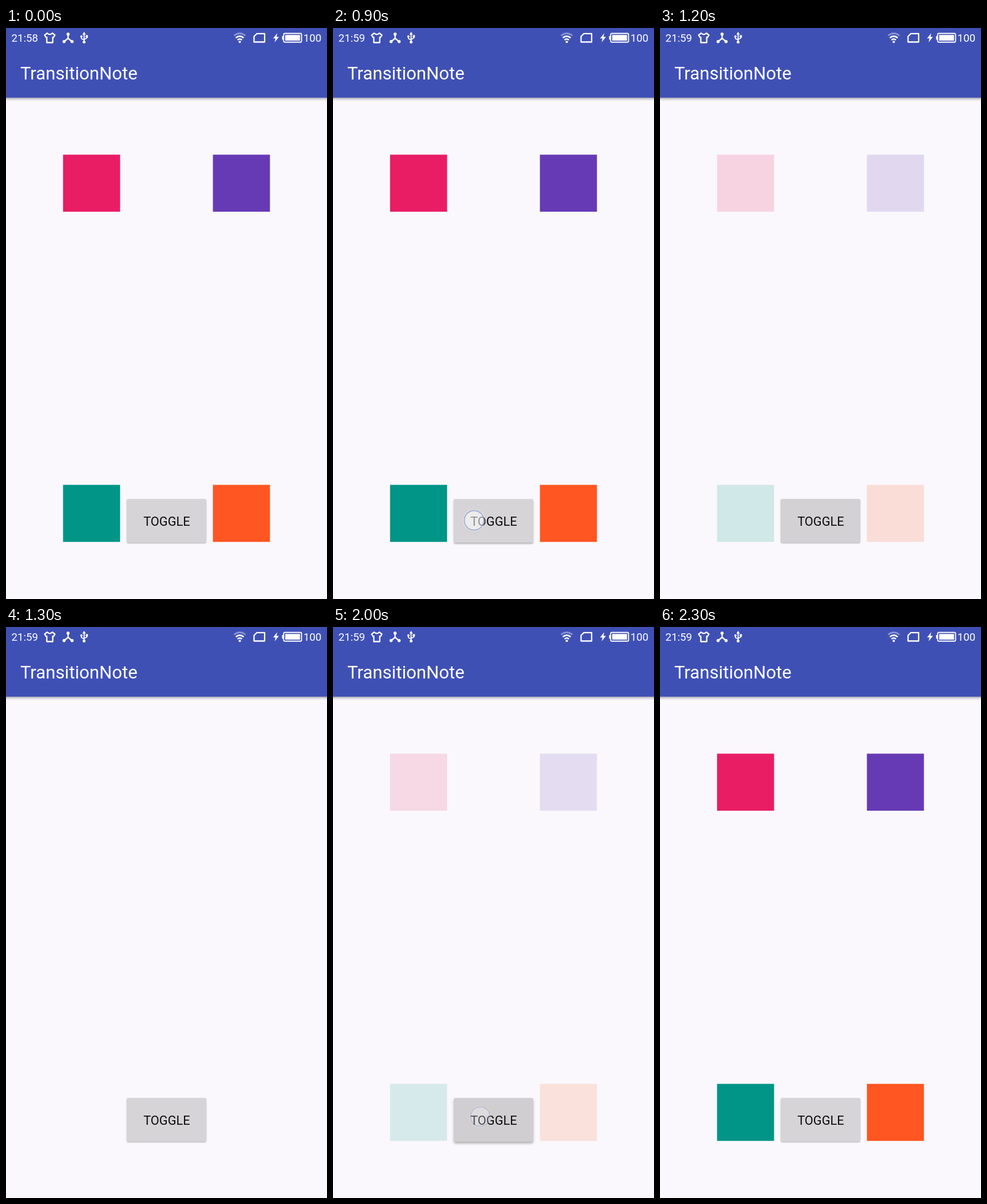
Animation of 561x998 px, one loop 2.4 s. Source, as an HTML page:

```html
<!DOCTYPE html>
<html lang="en">
<head>
<meta charset="utf-8">
<title>Fade transition</title>
<style>
  html, body { margin: 0; width: 100%; height: 100%; overflow: hidden; background: #faf8fc; }
  svg { display: block; width: 561px; height: 998px; }
  text { font-family: Roboto, "Noto Sans", sans-serif; fill: #fff; }
  .status { font-size: 18.7px; }
  .title { font-size: 31.2px; }
  .label { font-size: 21.8px; fill: #0c0c0c; text-anchor: middle; }
  .line { fill: none; stroke: #fff; stroke-width: 2.3; stroke-linejoin: round; }
  .icons { fill: #fff; }

  /* Everything holds for 100 ms ticks, so each track is stepped. */
  .before, .after, .boxes, .button, .touch { animation: 2400ms step-end infinite; }
  .before { animation-name: before; }
  .after { animation-name: after; }
  .boxes { animation-name: fade; }
  .button { animation-name: press; fill: #d6d4d6; }
  .touch { opacity: 0; }
  .first { animation-name: first; }
  .second { animation-name: second; }

  @keyframes before { 0% { opacity: 1 } 4.166%, 100% { opacity: 0 } }
  @keyframes after { 0% { opacity: 0 } 4.166%, 100% { opacity: 1 } }

  /* Accelerate-decelerate alpha, 300 ms out and 300 ms in. */
  @keyframes fade {
    0% { opacity: 1 }
    41.666% { opacity: .99 }
    45.833% { opacity: .647 }
    50% { opacity: .165 }
    54.166% { opacity: 0 }
    83.333% { opacity: .143 }
    87.5% { opacity: .624 }
    91.666% { opacity: .98 }
    95.833%, 100% { opacity: 1 }
  }

  @keyframes press {
    0%, 54.166%, 95.833%, 100% { fill: #d6d4d6; filter: drop-shadow(0 1.6px 1.2px rgba(0,0,0,.3)) }
    37.5% { fill: #d6d4d6; filter: drop-shadow(0 2.2px 1.5px rgba(0,0,0,.3)) }
    41.666% { fill: #d3d1d3; filter: drop-shadow(0 3.4px 2px rgba(0,0,0,.3)) }
    45.833%, 87.5% { fill: #cfccce; filter: drop-shadow(0 1.6px 1.2px rgba(0,0,0,.3)) }
    50%, 91.666% { fill: #d3d1d3; filter: drop-shadow(0 1.6px 1.2px rgba(0,0,0,.3)) }
    79.166% { fill: #d5d4d6; filter: drop-shadow(0 5px 2.2px rgba(0,0,0,.28)) }
    83.333% { fill: #d0ced0; filter: drop-shadow(0 3.4px 2px rgba(0,0,0,.3)) }
  }

  @keyframes first {
    0% { opacity: 0 }
    37.5% { opacity: 1 }
    41.666% { opacity: .9 }
    45.833% { opacity: .32 }
    50%, 100% { opacity: 0 }
  }
  @keyframes second {
    0% { opacity: 0 }
    79.166% { opacity: 1 }
    83.333% { opacity: .5 }
    87.5%, 100% { opacity: 0 }
  }
</style>
</head>
<body>
<svg viewBox="0 0 561 998">
  <defs>
    <linearGradient id="shade" x2="0" y2="1">
      <stop stop-color="#000" stop-opacity=".34"/>
      <stop offset=".45" stop-color="#000" stop-opacity=".13"/>
      <stop offset="1" stop-color="#000" stop-opacity="0"/>
    </linearGradient>
    <g id="finger">
      <circle r="18.8" fill="none" stroke="#fff" stroke-opacity=".3" stroke-width="1.5"/>
      <circle r="17" fill="#fff" fill-opacity=".55" stroke="#98a3d3" stroke-opacity=".8" stroke-width="1.8"/>
    </g>
  </defs>

  <rect width="561" height="998" fill="#faf8fc"/>
  <rect y="121.5" width="561" height="6.5" fill="url(#shade)"/>
  <rect width="561" height="121.8" fill="#3f50b5"/>

  <text class="status before" x="9.4" y="23.6">21:58</text>
  <text class="status after" x="9.4" y="23.6">21:59</text>
  <text class="status" x="519.8" y="23.6">100</text>
  <text class="title" x="24.9" y="90.3">TransitionNote</text>

  <g class="icons">
    <!-- shirt -->
    <path class="line" d="M72 9Q76.500 13.500 81 9L85.500 12.500 83 16.500 81.700 16V25.500H71.300V16L70 16.500 67.500 12.500Z"/>
    <!-- hub -->
    <path class="line" d="M108.500 11V18L102 23.500M108.500 18L115 23.500"/>
    <circle cx="108.500" cy="10.800" r="2.700"/>
    <circle cx="101.500" cy="23.700" r="2.700"/>
    <circle cx="115.500" cy="23.700" r="2.700"/>
    <!-- cable -->
    <path class="line" style="stroke-width:1.900" d="M136.500 11V24M131.800 15V18.500L136.500 21M141.300 14V17.500L136.500 20"/>
    <path d="M136.500 6.800L139.500 11.500H133.500Z"/>
    <circle cx="136.500" cy="24.600" r="2.500"/>
    <circle cx="131.800" cy="14.700" r="2"/>
    <rect x="139.300" y="12.500" width="3.900" height="3.900"/>
    <!-- signal -->
    <path class="line" style="stroke-width:2.600" opacity=".4" d="M398.500 13.300Q408.500 5.300 418.500 13.300"/>
    <path class="line" style="stroke-width:2.600" d="M401.600 17.300Q408.500 11.300 415.400 17.300M404.700 21Q408.500 17.500 412.300 21"/>
    <circle cx="408.500" cy="24.300" r="2"/>
    <!-- card -->
    <path class="line" d="M438.500 9.800H452V24.500H433.500V14.800Z"/>
    <!-- battery -->
    <path d="M474 9L466.800 18.300H471L469.500 25L477 15.600H472.700Z"/>
    <rect class="line" style="stroke-width:1.900" x="485.300" y="9.500" width="31.200" height="15.300" rx="2"/>
    <rect x="482.500" y="14" width="2.500" height="6.300"/>
    <rect x="488" y="12.200" width="25.800" height="9.900"/>
  </g>

  <g class="boxes">
    <rect x="99.7" y="221.4" width="99.7" height="99.7" fill="#e91d63"/>
    <rect x="361.6" y="221.4" width="99.7" height="99.7" fill="#673ab5"/>
    <rect x="99.7" y="798.5" width="99.7" height="99.7" fill="#009587"/>
    <rect x="361.6" y="798.5" width="99.7" height="99.7" fill="#ff5622"/>
  </g>

  <rect class="button" x="211.300" y="823.300" width="138.400" height="76.200" rx="2"/>
  <text class="label" x="280.900" y="869.500">TOGGLE</text>

  <g class="touch first"><use href="#finger" x="246.500" y="860.500"/></g>
  <g class="touch second"><use href="#finger" x="257.500" y="855.700"/></g>
</svg>
</body>
</html>
```
